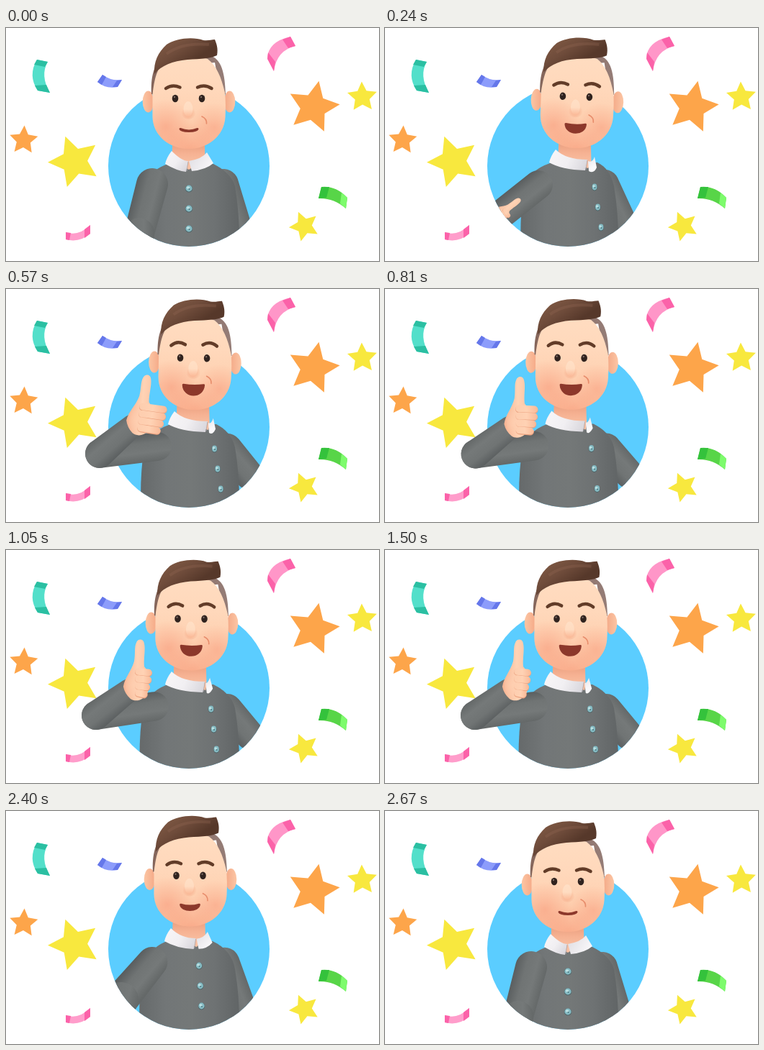
These frames come from a looping animation (518 px wide and 324 px high, 2.7 s). An HTML page with a canvas:

```html
<!DOCTYPE html>
<html lang="en">
<head>
<meta charset="utf-8">
<title>Thumbs up</title>
<style>
html, body { margin: 0; width: 100%; height: 100%; overflow: hidden; background: #fff; }
canvas { display: block; width: 518px; height: 324px; }
</style>
</head>
<body>
<canvas id="stage"></canvas>
<script>
const W = 518, H = 324, LOOP = 2700, STEP = 30;
const canvas = document.getElementById('stage');
const ctx = canvas.getContext('2d');
const ratio = window.devicePixelRatio || 1;
canvas.width = W * ratio;
canvas.height = H * ratio;

// Poses: time, then one value per name
const NAMES = ['hx', 'hy', 'rot', 'fx', 'open', 'brow', 'turn', 'collar', 'by', 'out',
  'ex', 'ey', 'er', 'wx', 'wy', 'spin', 'size', 'grip', 'reach'];
const REST = [0, 0, 0, 0, 0, 0, 0, 222, 0, 0, 185, 285, 21, 186, 345, 70, .4, 0, 100];
const HOLD = [4, -.5, .4, -.5, .95, 2.5, .83, 222, -2, 1, 125, 230, 20, 171, 195, 0, 1, 0, 300];
const POSES = [
  [0, ...REST],
  [240, 13, -1, 1.8, -1.2, .8, 1, 1, 229, -2, .45, 150, 268, 20, 152, 266, 50, .6, 0, 190],
  [570, 8.5, 0, 1, -1.5, 1, 3, .96, 226, -1, .95, 130, 229, 20, 176, 190, 5, 1, 1, 300],
  [1050, ...HOLD],
  [2070, ...HOLD],
  [2400, 2, -7.5, 0, -.5, .4, 1, .38, 221, -8, .3, 160, 262, 24, 148, 300, -60, .7, 0, 130],
  [2670, ...REST],
  [2700, ...REST]
];

function slope(i, k) {
  const a = POSES[i - 1], b = POSES[i], c = POSES[i + 1];
  if (!a || !c || (b[k] - a[k]) * (c[k] - b[k]) <= 0) return 0;
  return (c[k] - a[k]) / (c[0] - a[0]);
}

function poseAt(t) {
  let i = 0;
  while (t >= POSES[i + 1][0]) i++;
  const a = POSES[i], b = POSES[i + 1], d = b[0] - a[0], u = (t - a[0]) / d;
  const s = u * u * (3 - 2 * u), p = {};
  NAMES.forEach((name, n) => {
    const k = n + 1;
    p[name] = a[k] + (b[k] - a[k]) * s
      + d * u * (1 - u) * ((1 - u) * slope(i, k) - u * slope(i + 1, k));
  });
  return p;
}

function shape(d, fill, stroke, width) {
  const path = new Path2D(d);
  if (fill) { ctx.fillStyle = fill; ctx.fill(path); }
  if (stroke) { ctx.strokeStyle = stroke; ctx.lineWidth = width; ctx.stroke(path); }
}

function oval(x, y, rx, ry, fill) {
  ctx.beginPath();
  ctx.ellipse(x, y, rx, ry, 0, 0, 7);
  ctx.fillStyle = fill;
  ctx.fill();
}

function linear(x0, y0, x1, y1, ...colors) {
  const g = ctx.createLinearGradient(x0, y0, x1, y1);
  colors.forEach((c, i) => g.addColorStop(i / (colors.length - 1), c));
  return g;
}

function glow(x, y, r, rgb, alpha) {
  const g = ctx.createRadialGradient(x, y, 0, x, y, r);
  g.addColorStop(0, `rgba(${rgb},${alpha})`);
  g.addColorStop(1, `rgba(${rgb},0)`);
  return g;
}

function star(x, y, r, turn, color) {
  ctx.beginPath();
  for (let i = 0; i < 10; i++) {
    const a = turn * Math.PI / 180 + i * Math.PI / 5, q = i % 2 ? r * .49 : r;
    ctx.lineTo(x + q * Math.sin(a), y - q * Math.cos(a));
  }
  ctx.fillStyle = color;
  ctx.fill();
}

function ribbon(body, ends, light, dark) {
  shape(body, light);
  shape(ends, dark);
}

function confetti() {
  ribbon('M43 44L58 47Q47 66 61 90L44 87Q30 66 43 44',
    'M43 44L58 47L54 54L39 51ZM40 80L56 79L61 90L44 87Z', '#53dfca', '#2bbfa2');
  ribbon('M134 65Q146 74 161 72L155 82Q138 85 127 75Z',
    'M134 65L139 68L133 79L127 75ZM154 73L161 72L155 82L148 82Z', '#8c9cfb', '#6577ea');
  ribbon('M395 12Q364 19 363 42L372 60Q376 31 402 25Z',
    'M395 12L402 25L392 28L384 16ZM364 34L374 47L372 60L363 43Z', '#ff96c8', '#fb62a9');
  ribbon('M83 284Q101 290 117 274L117 286Q102 299 83 294Z',
    'M83 284L90 285L88 295L83 294ZM109 280L117 274L117 286L109 292Z', '#ff9dcb', '#fb62a9');
  ribbon('M438 221Q458 219 474 236L472 251Q455 236 434 237Z',
    'M438 221L449 221L445 236L434 237Z', '#58d548', '#34c23c');
  shape('M466 229L474 236L472 251L464 244Z', '#7dfb6c');
  star(24.5, 156, 20.5, 3, '#fda54a');
  star(95, 185.5, 37, -20, '#f8e83e');
  star(426.8, 110, 37, 12, '#fda54a');
  star(494.7, 96, 21.5, -2, '#f8e83e');
  star(414.3, 275.5, 21.5, -23, '#f8e83e');
}

// Tapered limb: two discs and their common tangents
function limb(x0, y0, r0, x1, y1, r1) {
  const dist = Math.hypot(x1 - x0, y1 - y0) || 1;
  const a = Math.atan2(y1 - y0, x1 - x0);
  const b = Math.acos(Math.max(-1, Math.min(1, (r0 - r1) / dist)));
  const nx = -Math.sin(a) * r0, ny = Math.cos(a) * r0;
  ctx.beginPath();
  ctx.arc(x0, y0, r0, a + b, a - b + 2 * Math.PI);
  ctx.arc(x1, y1, r1, a - b, a + b);
  ctx.closePath();
  ctx.fillStyle = linear(x0 - nx, y0 - ny, x0 + nx, y0 + ny,
    '#646868', '#757979', '#707474', '#5a5e5f');
  ctx.fill();
}

function bodyClip(reach) {
  ctx.beginPath();
  ctx.arc(254, 192, 112, 0, 2 * Math.PI);
  if (reach) ctx.rect(80, 0, 180, reach);
  ctx.clip();
}

function torso(p) {
  const l = 187 + .4 * (p.collar - 222), c = p.collar, y = p.by;
  limb(302 + 5 * p.out, 217 + y + 6 * p.out, 21, 323 + 16 * p.out, 283 - 25 * p.out, 20);
  shape(`M${c} ${190 + y}Q${l + 10} ${200 + y} ${l + 3} 222
    Q${l - 3} 262 ${l - 1} 310L324 310Q325 262 318 220
    C314 ${205 + y} ${c + 78} ${195 + y} ${c + 66} ${189 + y}Z`,
    linear(l, 0, 324, 0, '#666a6b', '#727677', '#747878', '#6e7273', '#616566'));
  for (let i = 0; i < 3; i++) {
    const x = 254 + 37 * p.turn + 4.5 * i * p.turn, by = 223 + y + 28 * i;
    const rx = 4.6 - 1.2 * p.turn;
    oval(x, by + .5, rx + .5, 5, '#4c6367');
    oval(x, by, rx, 4.4, '#86bcc4');
    oval(x - 1, by - 1, rx * .5, 1.8, '#bce0e2');
    oval(x + .5, by + 1, 1, 1, '#4c7880');
  }
}

function collar(p) {
  const l = p.collar, r = l + 66, t = 172 + p.by, k = p.turn, n = 254 + 28 * k;
  const tr = t + 1 + 8 * k;
  const nx = (253 + p.hx + l + 32) / 2;
  shape(`M${nx - 22} ${145 + p.hy}L${nx + 22} ${145 + p.hy}L${nx + 23} ${tr + 9}
    L${n} ${t + 25}L${nx - 23} ${t + 12}Z`,
    linear(0, 158 + p.hy, 0, 192 + p.hy, '#e99c7c', '#f6b293', '#f9c2a4'));
  shape(`M${l + 8} ${t - 1}Q${l + 1} ${t + 8} ${l - 1} ${t + 17}
    Q${l + 16} ${t + 27} ${n - 4} ${t + 28}L${n - 1} ${t + 13}
    Q${l + 22} ${t + 13} ${l + 8} ${t - 1}Z`,
    linear(l, t, n, t + 25, '#f8f6f8', '#f1eff2', '#d6d4da'));
  shape(`M${r - 9 + 5 * k} ${tr}Q${r - 16 + 9 * k} ${tr + 9} ${n} ${t + 13 + 2 * k}
    L${n + 4 - 3 * k} ${t + 27 + 2 * k}Q${r - 10 + 5 * k} ${tr + 24} ${r - k} ${tr + 15}Z`,
    linear(n, t, r, t + 20, '#dedce1', '#faf9fb'));
  shape(`M${n - 1} ${t + 14}L${n - 3} ${t + 27}`, null, '#aaa5aa', .8);
}

function head(p) {
  ctx.save();
  ctx.translate(253 + p.hx, 100 + p.hy);
  ctx.rotate(p.rot * Math.PI / 180);
  ctx.translate(-253, -100);
  oval(197.5, 102.5, 7.8, 15, linear(189, 0, 205, 0, '#fcc7a5', '#f5a987'));
  oval(310.5, 102.5, 7.8, 15, linear(304, 0, 320, 0, '#f4ab89', '#fdc9a8'));
  shape('M202 92C201 70 204 48 222 38L282 38C300 42 304 64 305 92L298 92L290 48L212 56L207 92Z',
    linear(202, 0, 305, 0, '#85665b', '#8f746c', '#957d77'));

  const face = new Path2D('M203.5 92C206 72 209 54 222 48C243 40 266 38 280 43C292 52 299 68 304 90' +
    'Q305.5 105 304.5 124C303 150 280 168 254 168C227 168 204 150 203.5 123Z');
  ctx.save();
  ctx.clip(face);
  ctx.fillStyle = linear(0, 42, 0, 169, '#ffdcc0', '#ffd8bb', '#fed0b0', '#fbbc9a');
  ctx.fillRect(190, 35, 130, 140);
  for (const [x, y, r, a] of [[222, 137, 38, .42], [289, 138, 34, .36], [254, 172, 40, .35]]) {
    ctx.fillStyle = glow(x, y, r, '246,137,107', a);
    ctx.fillRect(190, 35, 130, 140);
  }
  ctx.restore();

  shape('M206 64C205 47 211 34 223 23C236 14 260 12 274 17C281 18 285 16 290 16' +
    'C292 21 295 28 293 38C286 42 271 43 252 44C231 46 216 52 206 64Z',
    linear(225, 14, 250, 52, '#7e5843', '#6f4c3b', '#56382a'));
  shape('M223 36C240 23 260 21 282 23', null, 'rgba(145,103,84,.3)', 4);

  const o = p.open, k = p.brow * .6, b = 83 - p.brow;
  ctx.translate(p.fx, -2 * o);
  ctx.lineCap = ctx.lineJoin = 'round';
  shape(`M222 ${b + 1}Q231 ${b - 5 - k} 241.5 ${b - .5}`, null, '#623c28', 4.5);
  shape(`M266 ${b - .5}Q276 ${b - 5 - k} 285.5 ${b + 1}`, null, '#623c28', 4.5);
  for (const x of [235, 272]) {
    oval(x, 98, 4.3, 5.2, '#30231f');
    oval(x - 1, 96, 1.1, 1.3, '#806e68');
  }
  oval(253.5, 118, 10, 9, glow(253.5, 119, 10, '239,145,110', .6));
  oval(253, 113, 6.5, 11, linear(0, 102, 0, 124, '#ffdfc5', '#ffdcc1', '#fbb896'));
  shape('M272 123Q279 126 278.5 133', null, '#e78c6b', 1.6);

  const w = 12 + 2.2 * o, m = 140.5 - 5 * o;
  shape(`M${254 - w} ${m}Q254 ${m + 5 - 3 * o} ${254 + w} ${m}
    C${254 + w - 1} ${m + 4 + 14 * o} ${254 - w + 1} ${m + 4 + 14 * o} ${254 - w} ${m}Z`,
    '#8c382b', '#8c382b', 3);
  ctx.restore();
}

function hand(p) {
  const a = Math.atan2(p.wy - p.ey, p.wx - p.ex), d = 15 * p.size;
  ctx.save();
  ctx.translate(p.wx + d * Math.cos(a), p.wy + d * Math.sin(a));
  ctx.rotate(p.spin * Math.PI / 180);
  ctx.scale(p.size, p.size);
  ctx.lineCap = 'round';
  shape('M-20 4C-18 -9 -9 -17 -5 -31C-3 -42 -5 -51 -2 -57C0 -63 8 -63 9 -56C11 -47 8 -36 9 -24' +
    'L15 -16L14 12C9 23 -3 26 -10 21Q-18 14 -20 4Z',
    linear(-18, 0, 18, 0, '#f8b695', '#ffd3b5', '#fbc2a1'));
  for (let i = 0; i < 4; i++) {
    const y = -17 + 10 * i, x = 15 + 15 * p.grip - i * i * .7;
    shape(`M1 ${y + 1}L${x} ${y + 2.5}`, null, '#eba17f', 10);
    shape(`M1 ${y}L${x} ${y + 1.5}`, null, linear(-4, 0, x + 5, 0, '#fdcdae', '#ffd2b4', '#f9b997'), 9.5);
  }
  oval(-4, 2, 13, 18, glow(-4, 2, 18, '255,207,177', .85));
  ctx.restore();
}

function draw(t) {
  const p = poseAt(t);
  ctx.setTransform(ratio, 0, 0, ratio, 0, 0);
  ctx.fillStyle = '#fff';
  ctx.fillRect(0, 0, W, H);
  confetti();
  oval(254, 192, 112, 112, '#5bcdff');

  ctx.save();
  bodyClip(0);
  torso(p);
  ctx.restore();

  ctx.save();
  bodyClip(p.reach);
  limb(p.collar - 19 + 3 * p.turn, 217 + p.by + 3 * p.turn, 22 - 2 * p.turn, p.ex, p.ey, p.er);
  limb(p.ex, p.ey, p.er, p.wx, p.wy, 16);
  ctx.restore();

  collar(p);
  head(p);

  ctx.save();
  bodyClip(p.reach);
  hand(p);
  ctx.restore();
}

function tick() {
  const t = performance.now() % LOOP;
  draw(Math.floor(t / STEP) * STEP);
  requestAnimationFrame(tick);
}
tick();
</script>
</body>
</html>
```
